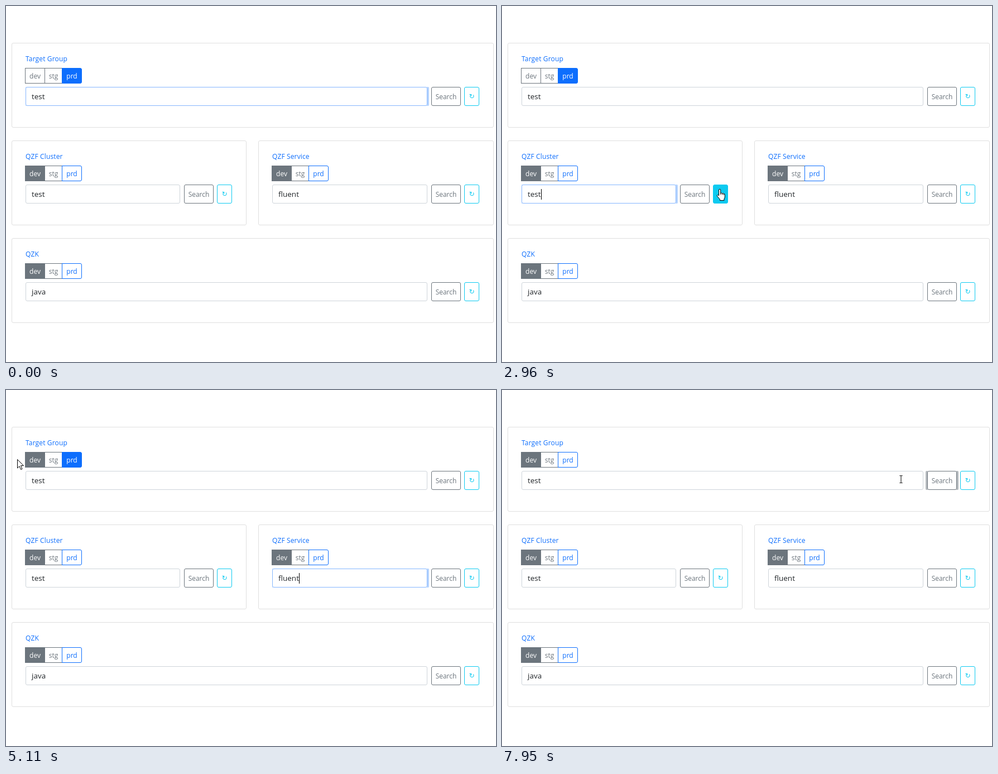
An HTML page for the animation above (8000 ms loop, 878 by 638 pixels).

```html
<!DOCTYPE html>
<html lang="en">
<head>
<meta charset="utf-8">
<title>Search panels</title>
<style>
  html, body { margin: 0; width: 100%; height: 100%; overflow: hidden; background: #fff; }
  body { position: relative; font: 12px/1 "Open Sans", "Noto Sans", sans-serif; }
  div { position: absolute; box-sizing: border-box; white-space: pre; }
  .card { border: 1px solid #dfdfdf; border-radius: 3px; }
  .title { color: #0d6efd; line-height: 18px; letter-spacing: .15px; }
  .row { overflow: hidden; }
  .input { border: 1px solid #ced4da; border-radius: 3px; padding-left: 10px;
           font-size: 13.5px; line-height: 33px; color: #212529; }
  .input.focus { border-color: #86b7fe; box-shadow: 0 0 0 3px #b6d4fe; }
  .caret { width: 1px; height: 19px; top: 8px; background: #000; visibility: hidden; }
  .btn { --c: #6c757d; --dark: #565e64; --ring: #b5babe;
         border: 1px solid var(--c); color: var(--c); text-align: center; }
  .tab { line-height: 27px; }
  .prd { --c: #0d6efd; --dark: #0b5ed7; --ring: #86b7fe; border-radius: 0 3px 3px 0; }
  .search, .reload { line-height: 33px; border-radius: 3px; }
  .reload { --c: #0dcaf0; --dark: #17a2b8; --ring: #8bd0db;
            font-family: "DejaVu Sans", sans-serif; }
  .btn.on { background: var(--c); color: #fff; }
  .btn.focus { box-shadow: 0 0 0 3px var(--ring); }
  .btn.down { background: var(--dark); border-color: var(--dark); color: #fff; }
  #cursor { position: absolute; left: 0; top: 0; overflow: visible; }
  #cursor path { fill: #fff; stroke: #000; stroke-width: 1; stroke-linejoin: round; }
</style>
</head>
<body>
<svg id="cursor" width="1" height="1">
  <path id="arrow" d="M.5 .5V16L4 12.6 6.6 18.5 9 17.5 6.5 11.6H11.5Z"/>
  <path id="hand" d="M-1.5 12V1.9a1.6 1.6 0 0 1 3.2 0V7.5q1.5-1.2 2.9.4 1.6-.9 2.7.7 2-.4 2 1.7V14q0 2-1.4 4v2.5H.5v-2L-4.5 12.6q-.8-1.6.8-2 1.2 0 2.2 1.4ZM1.7 7.5V10M4.6 8v2.4M7.3 8.8v2"/>
  <path id="beam" d="M-2.5-6.5H-.5L0-6 .5-6.5H2.5M0-6V6M-2.5 6.5H-.5L0 6 .5 6.5H2.5" style="fill:none"/>
</svg>
<script>
const LOOP = 8000, STEP = 68, BLINK = 530;
const cursor = document.getElementById('cursor');
const shapes = ['arrow', 'hand', 'beam'].map(id => document.getElementById(id));
const parts = {};

function box(parent, cls, x, y, w, h, text = '') {
  const el = document.createElement('div');
  el.className = cls;
  el.style.cssText = `left:${x}px;top:${y}px;width:${w}px;height:${h}px`;
  el.textContent = text;
  parent.append(el);
  return el;
}

function part(name, parent, cls, x, y, w, h, text, dx = 0, dy = 0) {
  const el = box(parent, cls, x, y, w, h, text);
  parts[name] = { el, x: x + dx, y: y + dy, w, h, input: cls === 'input' };
}

function panel(i, x, y, w, title, text, caretX) {
  const body = document.body, rx = x + 25, ry = y + 79, rw = w - 51;
  box(body, 'card', x, y, w, 152);
  box(body, 'title', rx, y + 20, 200, 18, title);
  part('dev' + i, body, 'btn tab', x + 24, y + 45, 36, 28, 'dev');
  part('stg' + i, body, 'btn tab', x + 59, y + 45, 32, 28, 'stg');
  part('prd' + i, body, 'btn tab prd', x + 90, y + 45, 36, 28, 'prd');
  const row = box(body, 'row', rx, ry, rw, 34);
  part('input' + i, row, 'input', 0, 0, rw - 93, 34, text, rx, ry);
  part('search' + i, row, 'btn search', rw - 86, 0, 53, 34, 'Search', rx, ry);
  part('reload' + i, row, 'btn reload', rw - 27, 0, 27, 34, '↻', rx, ry);
  const caret = document.createElement('div');
  caret.className = 'caret';
  caret.style.left = caretX + 'px';
  row.append(caret);
  parts['input' + i].caret = caret;
}

panel(0, 10, 66, 864, 'Target Group', 'test', 35);
panel(1, 10, 241, 421, 'QZF Cluster', 'test', 35);
panel(2, 452, 241, 422, 'QZF Service', 'fluent', 48);
panel(3, 10, 416, 864, 'QZK', 'java', 36);
document.body.append(cursor);

// pointer: time, x, y
const path = [
  [612, 855, 578], [1020, 852, 76], [1292, 830, 157], [1496, 837, 166],
  [1960, 837, 166], [2516, 410, 344], [2720, 390, 328], [2992, 390, 328],
  [3468, 843, 337], [3672, 834, 342], [3944, 834, 342], [4352, 846, 519],
  [4488, 845, 516], [4896, 110, 92], [5032, 42, 121], [5100, 20, 124],
  [5236, 17, 124], [5304, 17, 124], [5440, 50, 126], [5984, 54, 125],
  [6120, 48, 120], [6188, 52, 119], [6732, 755, 143], [6868, 756, 143],
  [6936, 756, 143], [7140, 785, 160], [7412, 785, 160], [7684, 735, 178],
  [7888, 735, 178], [7956, 715, 160]
];

// focus: time, part
const focusLog = [
  [-990, 'input0'], [1640, 'reload0'], [1700, 'input0'], [2820, 'reload1'],
  [2890, 'input1'], [3730, 'reload2'], [3860, 'input2'], [5880, 'dev0'],
  [5960, 'input0'], [7340, 'search0']
];

function pointAt(t) {
  if (t < path[0][0]) return null;
  const i = path.findIndex(k => k[0] > t);
  if (i < 0) return path[path.length - 1].slice(1);
  const [t0, x0, y0] = path[i - 1], [t1, x1, y1] = path[i];
  const u = (t - t0) / (t1 - t0), e = u * u * (3 - 2 * u);
  return [Math.round(x0 + (x1 - x0) * e), Math.round(y0 + (y1 - y0) * e)];
}

function hit(p) {
  return p && Object.keys(parts).find(n => {
    const r = parts[n];
    return p[0] >= r.x && p[0] < r.x + r.w && p[1] >= r.y && p[1] < r.y + r.h;
  });
}

function isChecked(name, t) {
  if (name === 'dev0') return t >= 5880;
  if (name === 'prd0') return t < 5960;
  return name.startsWith('dev');
}

function render(t) {
  const tick = Math.floor((t + 6) / STEP) * STEP;
  const p = pointAt(tick), over = hit(p);
  const hover = hit(pointAt(tick - STEP)); // button fill trails the pointer
  const [since, focus] = focusLog.filter(f => f[0] <= t).pop();

  for (const name in parts) {
    const { el, input, caret } = parts[name], focused = name === focus;
    el.classList.toggle('focus', focused);
    if (input) {
      const lit = focused && Math.floor((t - since) / BLINK) % 2 === 0;
      caret.style.visibility = lit ? 'visible' : 'hidden';
    } else {
      el.classList.toggle('on', name === hover || isChecked(name, t));
      el.classList.toggle('down', focused && (name.startsWith('reload') ||
        name === 'search0' && t < since + 70));
    }
  }

  cursor.style.display = p ? '' : 'none';
  if (!p) return;
  cursor.style.transform = `translate(${p[0]}px,${p[1]}px)`;
  const kind = !over ? 0 : parts[over].input ? 2 : 1;
  shapes.forEach((s, i) => s.style.display = i === kind ? '' : 'none');
}

const start = performance.now();
function frame() {
  render((performance.now() - start) % LOOP);
  requestAnimationFrame(frame);
}
frame();
</script>
</body>
</html>
```
